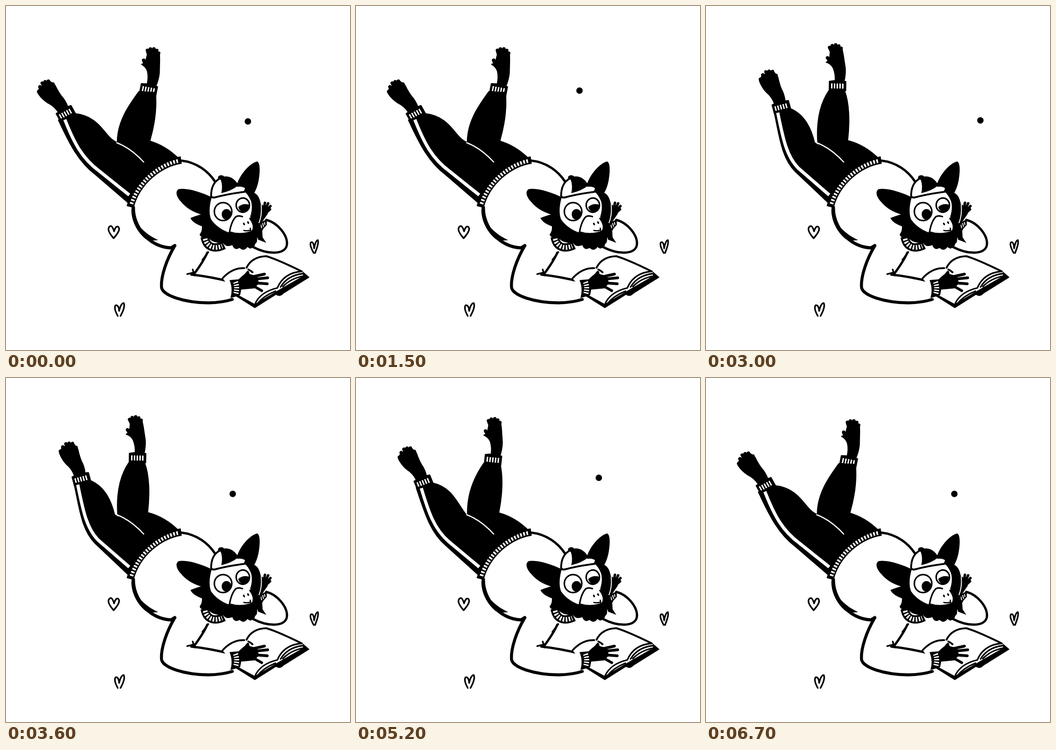
Animation of 748x748 px, one loop 6.8 s. Source, as an HTML page:

```html
<!DOCTYPE html>
<html lang="en">
<head>
<meta charset="utf-8">
<title>Reading</title>
<style>
  html, body { margin: 0; width: 100%; height: 100%; overflow: hidden; background: #fff }
  svg { display: block; width: 100vw; height: 100vh }
  .line { fill: none; stroke: #000; stroke-linecap: round; stroke-linejoin: round }
  .gap { fill: none; stroke: #fff }
  .paper { fill: #fff; stroke: #000; stroke-linejoin: round; stroke-linecap: round }
  .limb { stroke: #000; stroke-width: 2; stroke-linejoin: round }
</style>
</head>
<body>
<svg viewBox="0 0 748 748">
  <g id="legs"></g>

  <!-- sweater -->
  <path fill="#fff" d="M378 337C420 340 440 362 454 379L540 440L560 468L440 535L407 584L488 598L489 641L380 641L336 612L365 522C310 525 274 480 276 438C282 390 320 345 378 337Z"/>
  <path class="line" stroke-width="5" d="M380 336C416 340 440 360 454 381"/>
  <path class="line" stroke-width="7" d="M277 438C276 480 312 525 359 526L367 521"/>
  <path d="M273 436C275 468 298 494 331 509Q316 511 304 507C283 490 270 462 273 436Z"/>
  <path class="line" stroke-width="6.500" d="M366 523C350 550 337 586 338 610C338 630 390 645 440 645.500Q470 645 492 638"/>
  <path class="line" stroke-width="5" d="M403 584Q442 588 490 600M438 536Q429 556 408 584"/>
  <path class="line" stroke-width="3.500" d="M394 583L410 579M406 573L410 586M427 552L440 535"/>
  <path class="line" stroke-width="16" style="stroke-linecap:butt" d="M381 335C335 342 285 380 270 437"/>
  <path class="gap" stroke-width="8" stroke-dasharray="3.700 3.300" d="M374 337C332 346 287 383 272 433"/>

  <!-- propping arm -->
  <path class="paper" stroke-width="5" d="M566 465C592 472 611 498 611 516C611 541 572 542 537 524L545 500L556 486Z"/>
  <path d="M550 472L567 464L567 476L557 487L558 503L566 515L548 508L543 490Z"/>
  <path class="gap" stroke-width="2" d="M554 475L556 483M558 472L560 480M562 470L563 476"/>
  <path d="M548 440L556 432L570 441L569 452L558 468L548 474Z"/>
  <path class="line" stroke-width="5.500" d="M558 446L556 435M560 445L563 428M563 445L570 429M564 448L575 435M563 452L574 442"/>

  <!-- head -->
  <path d="M448 416C425 405 395 395 376 398C366 403 372 417 381 426C397 446 425 456 448 458Z"/>
  <path d="M502 388C509 366 530 342 546 338C554 341 552 365 549 381C546 396 541 404 537 412Z"/>
  <path d="M446 412L440 449Q415 455 401 461Q406 472 426 479Q427 489 421 497Q424 506 442 506Q450 516 472 515Q478 526 492 520Q497 533 508 526Q517 535 525 524Q536 533 537 518Q549 518 545 502Q556 497 551 484Q558 470 553 460Q558 444 554 430Q550 411 541 407L520 392Z"/>
  <path class="gap" stroke-width="2" d="M555 432Q557 455 550 472"/>
  <path fill="#fff" d="M447 417C442 435 441 452 446 464Q460 484 486 493Q512 501 536 491Q540 476 531 458Q537 440 533 425Q527 410 518 403Z"/>
  <g class="paper" stroke-width="3.300">
    <ellipse cx="472" cy="447" rx="19" ry="19.500"/>
    <ellipse cx="515" cy="433" rx="14.500" ry="15.500"/>
    <path d="M486 492Q490 468 500 458Q506 455 514 458" fill="none"/>
  </g>
  <path class="line" stroke-width="4" d="M531 462Q543 478 536 490Q510 500 486 492"/>
  <ellipse cx="479.500" cy="453" rx="10.500" ry="11.500"/>
  <path d="M505 437Q515 428 528 432Q529 443 518 448Q508 448 505 437Z"/>
  <ellipse cx="517.500" cy="474" rx="1.800" ry="3" transform="rotate(-25 517.500 474)"/>
  <ellipse cx="526.500" cy="471" rx="1.800" ry="3" transform="rotate(-25 526.500 471)"/>
  <path class="line" stroke-width="2.500" d="M517 488Q525 490 532 487M531 483L533 491"/>

  <!-- cap -->
  <path class="paper" stroke-width="4" d="M446 413Q446 385 465 375Q490 366 504 391Q517 390 522 396L519 404Q480 409 455 416Q448 418 446 413Z"/>
  <path d="M467 378Q490 366 504 391Q490 402 468 407Q472 392 467 378Z"/>
  <ellipse cx="468" cy="373" rx="7" ry="5"/>

  <!-- collar -->
  <path class="line" stroke-width="18" style="stroke-linecap:butt" d="M432 502C435 521 448 532 474 520"/>
  <path class="gap" stroke-width="10" stroke-dasharray="3.500 3" d="M433 506C436 521 450 530 470 522"/>

  <!-- book -->
  <path fill="#fff" d="M471 592Q492 568 524 572Q536 544 568 544L645 580L590 613L541 650L500 630Z"/>
  <path class="line" stroke-width="4" d="M471 592Q492 569 518 570M523 569Q535 545 566 544Q590 551 643 577M527 573Q532 575 536 579"/>
  <path d="M498 630L541 657L587 628Q596 634 604 625L660 590L645 577L646 587L597 615L541 648L508 630Z"/>
  <path class="line" stroke-width="3.300" d="M643 577Q604 580 590 613M645 582Q612 586 597 611M647 587Q620 592 602 610M541 649Q552 622 590 613M545 649Q560 630 586 620"/>

  <!-- resting hand -->
  <path d="M506 594Q514 586 527 577L530 583L546 587L550 603L540 614L508 617Z"/>
  <path class="line" stroke-width="6" d="M517 590L526 579M535 589L562 583M540 594L569 591M540 602L568 604M535 607L556 619"/>
  <path d="M486 596L509 594Q514 611 509 629L488 635Q494 615 486 596Z"/>
  <path class="gap" stroke-width="11" stroke-dasharray="2.800 2.900" d="M499 600Q504 613 499 628"/>

  <!-- hearts -->
  <path class="line" stroke-width="3.500" d="M234 505Q219 488 224 481Q230 473 235 490Q239 477 244 480Q251 486 234 505M669 537Q659 519 663 514Q669 511 670 527Q673 510 678 509Q681 515 672 537M243 674Q234 658 238 651Q245 649 246 663Q250 646 256 646Q260 654 249 674"/>

  <circle id="fly" r="7"/>
</svg>
<script>
const legs = document.getElementById('legs'), fly = document.getElementById('fly');

// Each pose: left leg, stripe, right leg, left foot (x y angle), right foot (x y angle)
const poses = {
  A: ['M114 248C138 300 158 340 196 368L268 430L300 340L243 297C214 288 208 240 150 234Z',
      'M128 247C148 298 166 332 203 359L268 411',
      'M289 186C268 215 242 250 242 296L300 342L345 320L313 293C324 255 328 220 325 188Z',
      '130 234 -26', '310 182 21'],
  B: ['M148 230C160 285 164 330 194 360L268 430L300 340L236 297C228 262 212 234 181 222Z',
      'M156 232C167 285 174 325 200 352L268 411',
      'M267 184C246 215 240 255 243 298L300 342L345 320L308 293C313 250 311 210 302 186Z',
      '164 220 -12', '286 174 11'],
  C: ['M168 226C168 275 172 315 180 349L268 430L300 340L242 298C238 272 226 246 205 224Z',
      'M178 227C178 275 181 315 188 343L268 411',
      'M247 188C236 220 236 260 244 299L300 342L345 320L307 293C310 255 296 205 282 182Z',
      '187 216 0', '264 177 0']
};
const halfway = (a, b) => {
  const other = b.match(/-?\d+/g);
  let i = 0;
  return a.replace(/-?\d+/g, n => (+n + +other[i++]) / 2);
};
poses.D = poses.A.map((part, i) => halfway(part, poses.B[i]));
const swing = 'ADBBCCCCCCCCBBDAA';

const cuff = (w, tilt) => `<g transform="rotate(${tilt})">
  <path class="limb" d="M${-w} -10Q0 -14 ${w} -10V10Q0 14 ${-w} 12Z"/>
  <path class="gap" stroke-width="11" stroke-dasharray="3 3" d="M${4 - w} 0H${w - 3}"/></g>`;

// Foot outlines are drawn around their cuff centres
const foot = (place, cx, cy, body, toes, cuffMark) => {
  const [x, y, angle] = place.split(' ');
  return `<g transform="translate(${x} ${y}) rotate(${angle})">
    <g transform="translate(${-cx} ${-cy})"><path class="limb" d="${body}"/>
    <path class="line" stroke-width="7.500" d="${toes}"/></g>${cuffMark}</g>`;
};

function drawLegs([left, stripe, right, leftFoot, rightFoot]) {
  return foot(leftFoot, 187, 216,
      'M174 208Q172 190 162 178Q154 165 152 150L160 140L186 136L193 150Q193 172 197 185Q199 197 197 208Z',
      'M166 160L155 147M168 155L162 139M172 150L170 134M178 150L177 134M182 150L184 136M186 158L190 146',
      cuff(18.5, -3)) +
    foot(rightFoot, 264, 177,
      'M257 168Q255 152 247 140Q240 132 230 131L236 125L234 105L258 95L263 107L273 135Q277 150 276 166Z',
      'M238 128L231 121M240 110L231 98M244 108L236 93M247 105L243 90M252 104L250 91M256 108L256 95',
      cuff(18, -10)) +
    `<path d="M244 299L310 292Q348 302 378 333L290 395L270 420L268 400L250 330Z"/>
    <path class="limb" d="${left}"/><path class="limb" d="${right}"/>
    <path class="gap" stroke-width="2.500" d="M240 297Q272 309 300 340"/>
    <path class="gap" stroke-width="7" stroke-linejoin="round" d="${stripe}"/>`;
}

// Figure-eight flight: step, x, y
const flight = [
  [0, 526, 251], [2, 493, 252], [4, 456, 243], [6, 422, 217], [8, 404, 186], [10, 414, 160],
  [13, 454, 166], [15, 486, 184], [18, 528, 217], [21, 569, 256], [23, 605, 290], [25, 653, 305],
  [26, 671, 294], [27, 669, 266], [28, 646, 250], [29, 618, 248], [31, 577, 250], [33, 540, 252]
];
const lap = 34;
const key = i => {
  const n = flight.length, [t, x, y] = flight[(i + n) % n];
  return [t + lap * Math.floor(i / n), x, y];
};
function flyAt(t) {
  const i = flight.findLastIndex(k => k[0] <= t);
  const [a, b, c, d] = [-1, 0, 1, 2].map(o => key(i + o));
  const span = c[0] - b[0], u = (t - b[0]) / span;
  return [1, 2].map(k => {
    const m0 = (c[k] - a[k]) / (c[0] - a[0]) * span;
    const m1 = (d[k] - b[k]) / (d[0] - b[0]) * span;
    return b[k] + u * (m0 + u * (3 * (c[k] - b[k]) - 2 * m0 - m1 + u * (2 * (b[k] - c[k]) + m0 + m1)));
  });
}

let shown;
function tick() {
  const step = Math.floor(performance.now() / 100);
  const pose = swing[step % swing.length];
  if (pose !== shown) legs.innerHTML = drawLegs(poses[shown = pose]);
  const [x, y] = flyAt(step % lap);
  fly.setAttribute('cx', x);
  fly.setAttribute('cy', y);
  requestAnimationFrame(tick);
}
tick();
</script>
</body>
</html>
```
